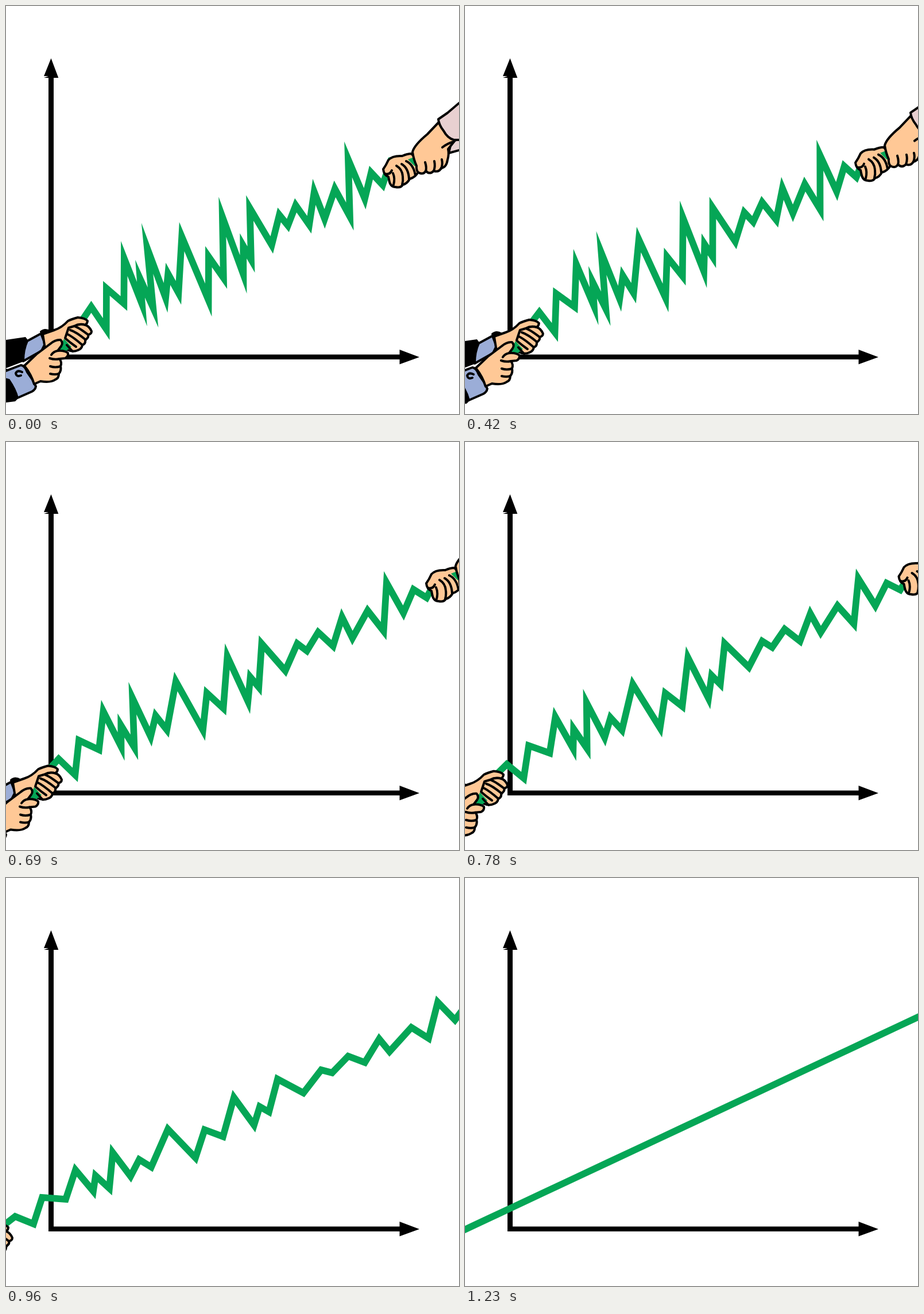
These frames come from a looping animation (789 by 710 pixels, 1620 ms). An HTML page with a canvas:

```html
<!DOCTYPE html>
<html lang="en">
<head>
<meta charset="utf-8">
<title>Stretching the chart line</title>
<style>
html, body { margin: 0; width: 100%; height: 100%; overflow: hidden; background: #fff; }
canvas { display: block; }
</style>
</head>
<body>
<canvas id="stage" width="789" height="710"></canvas>
<script>
const ctx = document.getElementById('stage').getContext('2d');
const LOOP = 1620;
const GREEN = '#05a656', SKIN = '#ffc896', BLUE = '#9badd7', PINK = '#e8d0d1', BLACK = '#000';

// Start time of each slow step; afterwards two steps pass every 30 ms.
const starts = [0, 270, 420, 510, 570, 630, 690, 720, 780, 810, 840, 870, 900, 930, 960];
const MID = 14, LAST = 32;

// The line when it is half stretched.
const points = [
  [-78, 662], [16, 589], [48, 602], [63, 556], [104, 559], [121, 508], [152, 545],
  [156, 518], [180, 540], [186, 478], [217, 519], [232, 490], [253, 503], [282, 437],
  [330, 487], [346, 438], [378, 450], [397, 382], [432, 430], [442, 398], [458, 407],
  [473, 350], [518, 374], [549, 334], [568, 339], [596, 310], [625, 321], [650, 280],
  [668, 302], [706, 260], [736, 279], [752, 216], [782, 247], [808.3, 212.4],
  [834.5, 217], [865, 183], [930, 159]
];

// Hand offsets: step, x, y.
const leftKeys = [[0, 0, 0], [1, -5, 0.5], [4, -29.5, 11], [6, -52, 21.5], [10, -98, 40], [14, -138, 60], [32, -330, 150]];
const rightKeys = [[0, 0, 0], [1, 11, -6], [4, 47, -22], [6, 75, -38], [10, 122, -62], [14, 168, -85], [32, 380, -190]];

const mix = (a, b, k) => a + (b - a) * k;

function stepAt(t) {
  if (t >= 960) return Math.min(LAST, MID + 2 * Math.floor((t - 960) / 30));
  return starts.filter(s => s <= t).length - 1;
}

function offsetAt(keys, step) {
  const i = Math.max(1, keys.findIndex(k => k[0] >= step));
  const [a, b] = [keys[i - 1], keys[i]];
  const k = (step - a[0]) / (b[0] - a[0]);
  return [mix(a[1], b[1], k), mix(a[2], b[2], k)];
}

// Folded pose is an affine image of the middle one; the end lies on a straight slope.
function place([x, y], step) {
  const x0 = 0.7256 * x + 0.232 * y + 0.2;
  const y0 = 0.518 * x + 1.71 * y - 492;
  if (step <= MID) return [mix(x0, x, step / MID), mix(y0, y, step / MID)];
  const endX = mix(x0, x, LAST / MID);
  const endY = 611.7 - 0.4685 * endX;
  const k = (step - MID) / (LAST - MID);
  return [mix(x, endX, k), mix(y, endY, k)];
}

const shape = (fill, d, line = true) => ({ fill, line, path: new Path2D(d) });
const strokes = d => shape(null, d);

const leftHands = [
  shape(BLACK, 'M-10 583L0 581L34 576L40 584L32 618L-10 634Z', false),
  shape(BLUE, 'M37 583L61 570L68 588L62 600L30 618Q30 598 37 583Z'),
  shape(BLACK, 'M61 567Q68 561 77 567L65 572Z'),
  shape(SKIN, 'M64 571L84 564Q97 560 108 548Q114 545 125 542Q138 543 142 548Q142 552 138 555Q145 557 149 566Q149 571 143 572Q145 577 138 581Q139 588 133 590Q132 597 125 599Q117 603 106 598L98 592L68 596Z'),
  shape(GREEN, 'M101 579L114 593L105 600L92 599Z', false),
  strokes('M138 555Q128 552 119 557M119 557Q126 559 143 572M112 564Q122 567 139 581M107 571Q117 576 133 590M104 579Q112 586 122 593M119 557L109 560L103 578M106 590L116 601'),
  shape(BLACK, 'M-10 634L0 631L10 634L20 684L16 688L0 690L-10 690Z', false),
  shape(BLUE, 'M-10 637L0 635L26 625Q33 626 37 637L46 650L52 662Q51 668 45 671L20 682Q16 667 5 651L-10 647Z'),
  shape(SKIN, 'M32 626L53 606L77 588Q86 580 95 581Q100 586 96 592L90 600Q102 599 108 604Q109 610 103 613L93 614Q98 620 95 627Q97 634 92 640Q92 648 86 650Q78 656 60 653L49 658Q44 641 32 626Z'),
  strokes('M90 600Q83 601 79 607M76 613Q85 616 93 614M77 627Q86 630 95 627M77 640Q85 642 92 640'),
  strokes('M28 637Q20 633 17 639Q18 646 26 643')
];

const rightHands = [
  shape(SKIN, 'M657 284Q662 277 666 268Q673 260 690 261Q699 257 706 257L713 264L718 289Q713 298 703 301Q699 309 691 311Q688 317 678 315Q669 315 667 302L666 297Q658 294 657 284Z'),
  shape(GREEN, 'M700 267L713 262L718 281L711 278Z', false),
  strokes('M660 292Q669 294 672 286M674 291Q678 300 675 311M680 278Q690 284 691 296Q692 304 690 311M689 275Q701 282 702 301M697 270Q710 276 713 295'),
  shape(PINK, 'M800 230L776 235L771 256L800 248Z'),
  shape(SKIN, 'M753 203L734 223Q711 242 708 254Q710 267 715 278Q714 289 721 291Q728 293 731 287Q738 294 745 287Q754 290 758 282Q767 281 769 268Q772 258 770 249L782 234Q771 219 753 203Z'),
  strokes('M730 272Q733 281 731 288M746 270Q748 279 745 287M759 267Q761 275 758 283M760 246Q769 239 780 236'),
  shape(PINK, 'M800 160L789 169L769 186L753 197Q754 207 762 217Q769 230 780 233L800 233Z')
];

function drawHands(parts, [dx, dy]) {
  ctx.save();
  ctx.translate(dx, dy);
  ctx.lineWidth = 4;
  ctx.lineJoin = ctx.lineCap = 'round';
  ctx.strokeStyle = BLACK;
  for (const { fill, line, path } of parts) {
    if (fill) {
      ctx.fillStyle = fill;
      ctx.fill(path);
    }
    if (line) ctx.stroke(path);
  }
  ctx.restore();
}

const axes = new Path2D('M74 615V122H66L78.5 91L91.3 125H83V606.5H685.5V598L720 611L685.5 623.5V615ZM66 125L74 122V125Z');

function drawLine(step) {
  ctx.beginPath();
  for (const p of points) ctx.lineTo(...place(p, step));
  ctx.strokeStyle = GREEN;
  ctx.lineWidth = 11.7;
  ctx.lineJoin = 'miter';
  ctx.miterLimit = 20;
  ctx.stroke();
}

function draw(step) {
  ctx.fillStyle = '#fff';
  ctx.fillRect(0, 0, 789, 710);
  ctx.fillStyle = BLACK;
  ctx.fill(axes);
  drawLine(step);
  drawHands(leftHands, offsetAt(leftKeys, step));
  drawHands(rightHands, offsetAt(rightKeys, step));
}

const begin = performance.now();
function tick() {
  draw(stepAt((performance.now() - begin) % LOOP));
  requestAnimationFrame(tick);
}
tick();
</script>
</body>
</html>
```
